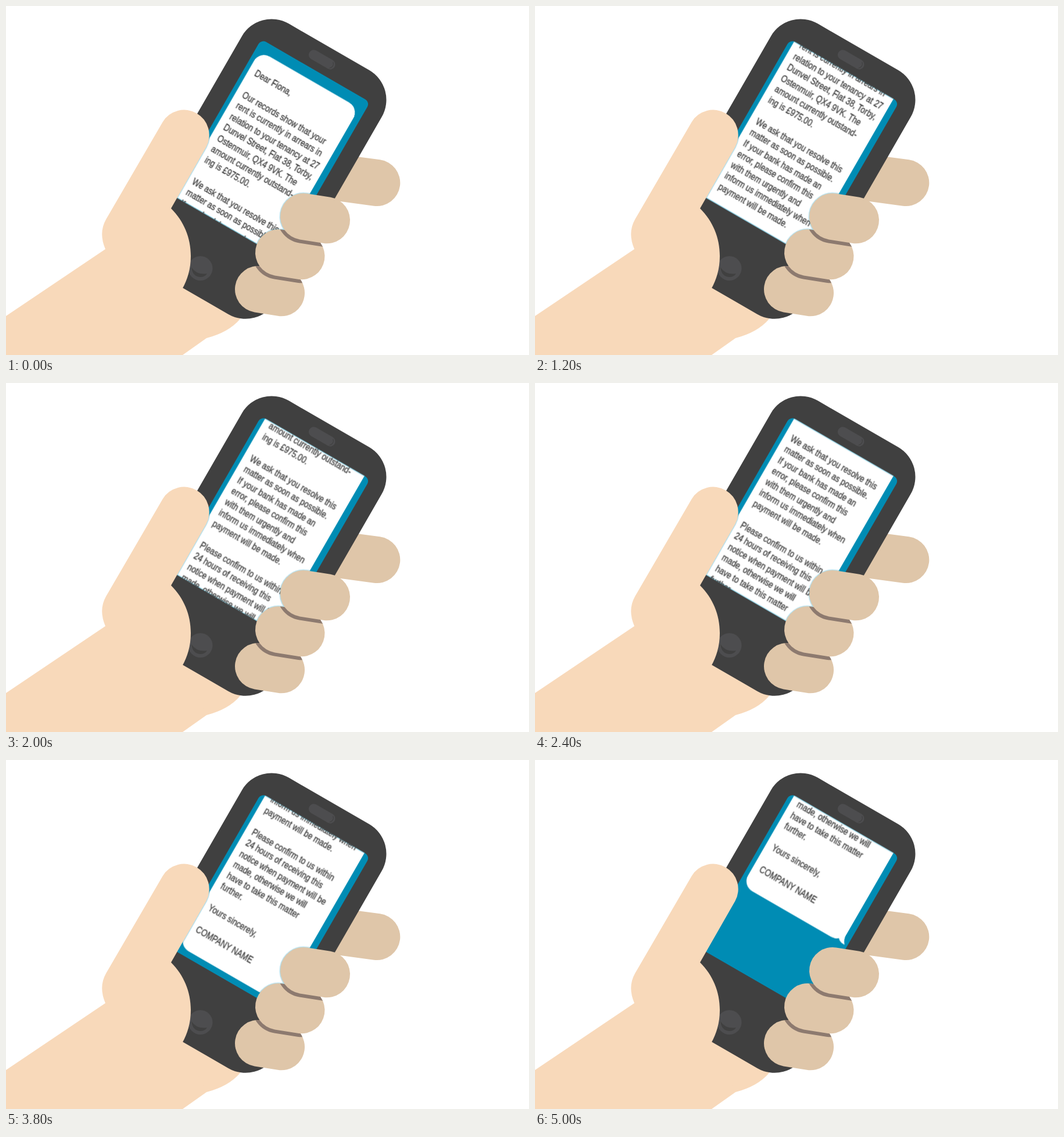
An HTML page for the animation above (10 s loop, 900x600 px).

```html
<!DOCTYPE html>
<html lang="en">
<head>
<meta charset="utf-8">
<title>Letter on a phone</title>
<style>
  html, body { margin: 0; width: 100%; height: 100%; overflow: hidden; background: #fff; }
  svg { display: block; width: 100%; height: 100%; }
  .scroll { animation: up 10s linear infinite; }
  .still { animation: down 10s linear infinite; }
  @keyframes up {
    0% { transform: translateY(0); animation-timing-function: steps(25); }
    50%, 100% { transform: translateY(-496.5px); }
  }
  @keyframes down {
    0% { transform: translateY(0); animation-timing-function: steps(25); }
    50%, 100% { transform: translateY(496.5px); }
  }
  .skin { fill: #f8d9ba; }
  .finger { fill: #dfc6a9; }
  .shade { fill: none; stroke: #8d7a6f; stroke-width: 12; }
  .edge { fill: none; stroke: #a9d9e6; stroke-width: 2.4; }
  .case { fill: #404040; }
  .detail { fill: #4d4d4f; }
  text {
    font: 17px "Liberation Sans", Arial, sans-serif;
    fill: #3a3a3a; stroke: #3a3a3a; stroke-width: .35;
    white-space: pre;
  }
</style>
</head>
<body>
<svg viewBox="0 0 900 600">
  <defs>
    <rect id="screen" x="409" y="-170.2" width="216.2" height="308.7" rx="9.5"/>
    <path id="bubble" d="M436.5 -151.7H594.3a20 20 0 0 1 20 20V485.4Q613 498 620.6 505.4
      Q611 506 606 500.5Q602 505 592 505H436.5a20 20 0 0 1 -20 -20V-131.7a20 20 0 0 1 20 -20Z"/>
    <path id="hand" d="M171 418Q159 390 172 367L269.6 199.4A43.2 43.2 0 0 1 344.4 242.6L284 348
      C306 370 318 398 318 430C318 452 312 471 303.5 486L345 571L304 600H0V533Z"/>
    <rect id="middle" x="-40" y="-40" width="120.5" height="80" rx="40" transform="translate(512 362) rotate(9)"/>
    <rect id="ring" x="-40" y="-40" width="120" height="80" rx="40" transform="translate(469 424) rotate(9)"/>
    <rect id="little" x="-40" y="-40" width="120.5" height="80" rx="40" transform="translate(434 487) rotate(9)"/>
    <clipPath id="inScreen"><use href="#screen"/></clipPath>
    <clipPath id="inText"><rect x="400" y="-171" width="240" height="310"/></clipPath>
    <clipPath id="inBubble"><use href="#bubble"/></clipPath>
    <clipPath id="inRing"><use href="#ring"/></clipPath>
    <clipPath id="inLittle"><use href="#little"/></clipPath>
  </defs>

  <path class="skin" d="M303 480L410 530L402 539Q383 561 345 571L280 560Z"/>
  <rect class="finger" x="-120" y="-40" width="160" height="80" rx="40" transform="translate(638.3 304) rotate(7.6)"/>

  <g transform="rotate(30)">
    <rect class="case" x="377.5" y="-217" width="277.9" height="484.6" rx="59"/>
    <rect class="detail" x="492" y="-200.5" width="50" height="17" rx="8.5"/>
    <path d="M535.5 -198a7.5 7.5 0 0 1 0 12" fill="none" stroke="#404040"/>
    <use href="#screen" fill="#008cb4"/>
    <g clip-path="url(#inScreen)">
      <g class="scroll" clip-path="url(#inBubble)">
        <use href="#bubble" fill="#fff"/>
        <g class="still">
          <use href="#screen" class="edge"/>
          <g transform="rotate(-30)" class="edge">
            <use href="#hand"/>
            <use href="#middle"/>
            <use href="#ring"/>
          </g>
        </g>
      </g>
    </g>
    <g clip-path="url(#inText)">
      <g class="scroll"><g id="letter" transform="translate(429 -110) scale(.8 1)"></g></g>
    </g>
  </g>

  <circle class="detail" cx="334.5" cy="451" r="21"/>
  <path class="case" d="M319 449Q321 465 334 466Q342 466 346 460Q328 463 319 449Z"/>
  <use href="#hand" class="skin"/>

  <use href="#little" class="finger"/>
  <g clip-path="url(#inLittle)"><use href="#ring" class="shade"/></g>
  <use href="#ring" class="finger"/>
  <g clip-path="url(#inRing)"><use href="#middle" class="shade"/></g>
  <use href="#middle" class="finger"/>
</svg>
<script>
  const lines = [
    "Dear Fiona,",
    "",
    "Our records show that your",
    "rent is currently in arrears in",
    "relation to your tenancy at 27",
    "Dunvel Street, Flat 38, Torby,",
    "Ostenmuir, QX4 9VK. The",
    "amount currently outstand-",
    "ing is £975.00.",
    "",
    "We ask that you resolve this",
    "matter as soon as possible.",
    "If your bank has made an",
    "error, please confirm this",
    "with them urgently and",
    "inform us immediately when",
    "payment will be made.",
    "",
    "Please confirm to us within",
    "24 hours of receiving this",
    "notice when payment will be",
    "made, otherwise we will",
    "have to take this matter",
    "further.",
    "",
    "Yours sincerely,",
    "",
    "COMPANY NAME"
  ];
  const letter = document.getElementById("letter");
  lines.forEach((line, i) => {
    if (!line) return;
    const el = document.createElementNS(letter.namespaceURI, "text");
    el.setAttribute("y", i * 21.5);
    el.textContent = line;
    letter.append(el);
  });
</script>
</body>
</html>
```
